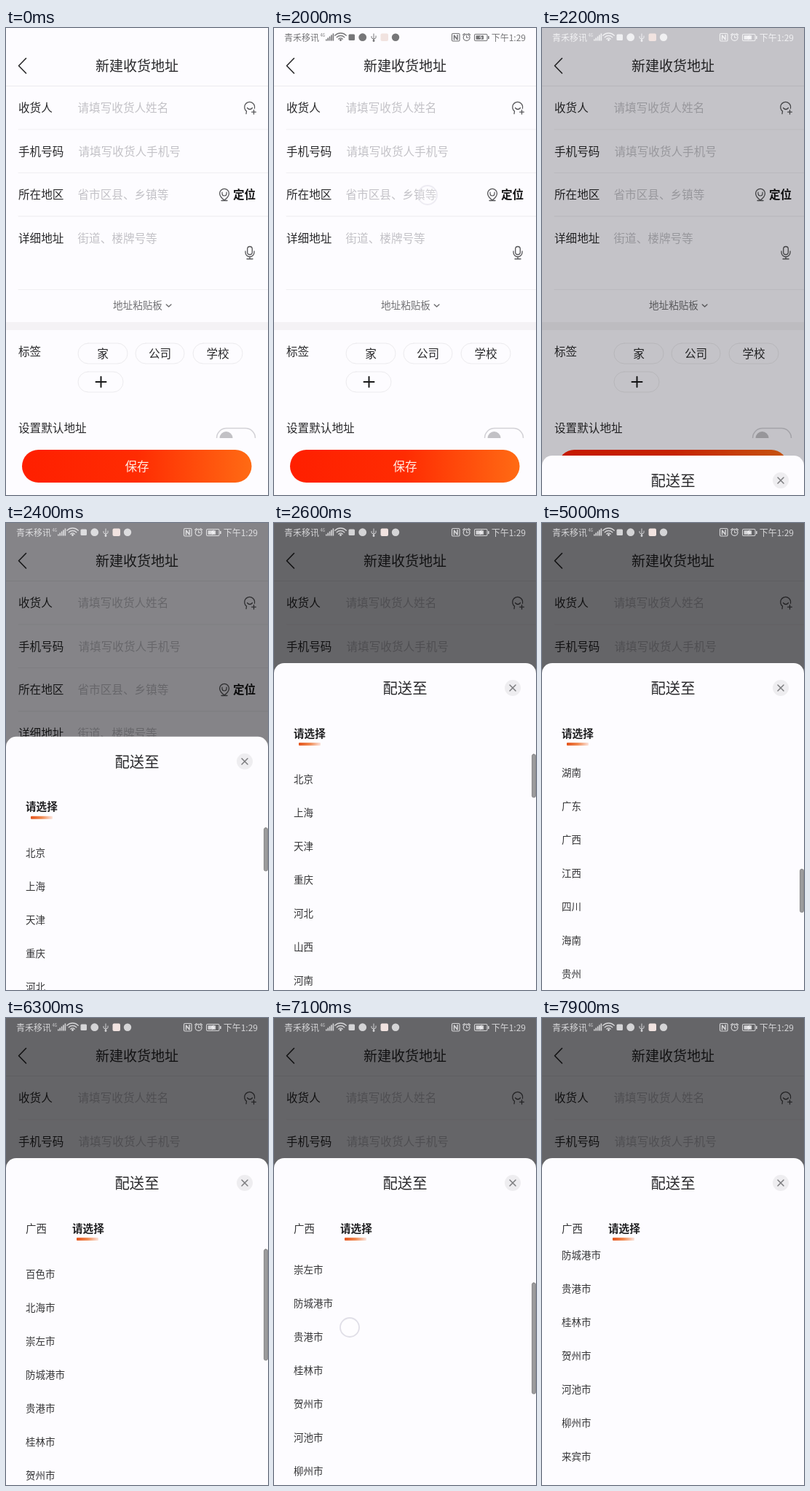
Write an HTML page with a canvas that moves like this. It is 360 by 640 pixels and loops after 8000 ms.

```html
<!DOCTYPE html>
<html lang="zh-CN">
<head>
<meta charset="utf-8">
<title>新建收货地址</title>
<style>
html, body { margin: 0; width: 100%; height: 100%; overflow: hidden; background: #fdfcff; }
canvas { display: block; width: 360px; height: 640px; }
</style>
</head>
<body>
<canvas id="stage"></canvas>
<script>
const W = 360, H = 640, LOOP = 8000, STEP = 100;
const FONT = '"Noto Sans CJK SC", "Noto Sans CJK", "Noto Sans", sans-serif';
const PAPER = '#fdfcff', INK = '#29292b', HINT = '#c3c2c7', LINE = '#f0eff2', ICON = '#555558';
const ROW = 46, LIST_TOP = 314;

const provinces = ('北京 上海 天津 重庆 河北 山西 河南 辽宁 吉林 黑龙江 内蒙古 江苏 山东 安徽 浙江 福建 ' +
  '湖北 湖南 广东 广西 江西 四川 海南 贵州 云南 西藏 陕西 甘肃 青海 宁夏 新疆 港澳 台湾 海外').split(' ');
const cities = '百色 北海 崇左 防城港 贵港 桂林 贺州 河池 柳州 来宾 南宁 钦州 梧州 玉林'
  .split(' ').map(name => name + '市');

const canvas = document.getElementById('stage');
const ctx = canvas.getContext('2d');
const dpr = window.devicePixelRatio || 1;
canvas.width = W * dpr;
canvas.height = H * dpr;

const clamp = x => Math.max(0, Math.min(1, x));
const ramp = (t, a, b) => clamp((t - a) / (b - a));
const easeOut = p => 1 - (1 - p) ** 3;
const easeInOut = p => p < .5 ? 2 * p * p : 1 - 2 * (1 - p) ** 2;
const mix = (a, b, p) => a + (b - a) * p;

// Keys are [time, value, ease into this key]
function track(keys, t) {
  if (t <= keys[0][0]) return keys[0][1];
  for (let i = 1; i < keys.length; i++) {
    const [t1, v1, ease = p => p] = keys[i];
    const [t0, v0] = keys[i - 1];
    if (t <= t1) return mix(v0, v1, ease((t - t0) / (t1 - t0)));
  }
  return keys[keys.length - 1][1];
}
const gray = v => `rgb(${Math.round(v)},${Math.round(v)},${Math.round(v) + 2})`;

const SHADE = [[2050, 253], [2200, 198], [2500, 102]];
const STATUS = [[2050, 118], [2200, 240], [2500, 212]];
const SCROLL_A = [[2900, 0], [3000, 12], [3150, 150], [3850, 915, easeOut], [3900, 915],
  [4400, 835, easeInOut], [5250, 790, easeOut]];
const SCROLL_B = [[6750, 0], [7050, 76], [7600, 164, easeOut]];
const BAR = [[2600, 1], [2850, 0], [2950, 0], [3000, 1], [5000, 1], [5300, 0], [6000, 0],
  [6200, 1], [7550, 1], [7850, 0]];
// Touches: start, end, from, to
const TOUCHES = [
  [1700, 1900, [211, 229], [211, 229]],
  [3000, 3150, [104, 540], [104, 390]],
  [3900, 4400, [104, 377], [104, 457]],
  [5500, 5650, [70, 436], [70, 436]],
  [6800, 7050, [104, 500], [104, 424]]
];

function text(str, x, y, size, color = INK, weight = 400, align = 'left') {
  ctx.font = `${weight} ${size}px ${FONT}`;
  ctx.textAlign = align;
  ctx.fillStyle = color;
  ctx.fillText(str, x, y + size * .38);
}
function box(x, y, w, h, r, fill) {
  ctx.beginPath();
  ctx.roundRect(x, y, w, h, r);
  if (fill) { ctx.fillStyle = fill; ctx.fill(); }
}
function disc(x, y, r, fill) {
  ctx.beginPath();
  ctx.arc(x, y, r, 0, Math.PI * 2);
  if (fill) { ctx.fillStyle = fill; ctx.fill(); }
}
function stroke(color, width) {
  ctx.strokeStyle = color;
  ctx.lineWidth = width;
  ctx.stroke();
}
function path(d, color, width) {
  ctx.strokeStyle = color;
  ctx.lineWidth = width;
  ctx.stroke(new Path2D(d));
}
function clipped(x, y, w, h, draw) {
  ctx.save();
  ctx.beginPath();
  ctx.rect(x, y, w, h);
  ctx.clip();
  draw();
  ctx.restore();
}
function gradient(x0, x1, ...stops) {
  const g = ctx.createLinearGradient(x0, 0, x1, 0);
  stops.forEach((c, i) => g.addColorStop(i / (stops.length - 1), c));
  return g;
}

function drawForm() {
  ctx.fillStyle = PAPER;
  ctx.fillRect(0, 0, W, H);
  path('M27.5 41.5 L17.5 51.7 L27.5 62', INK, 1.6);
  text('新建收货地址', 180, 52, 19, INK, 400, 'center');
  path('M0 79.5 H360 M17 258 H360', '#ecebee', 1);
  path('M17 139 H360 M17 198.5 H360 M17 358.5 H360', LINE, 1);

  [['收货人', '请填写收货人姓名', 109], ['手机号码', '请填写收货人手机号', 169],
   ['所在地区', '省市区县、乡镇等', 228], ['详细地址', '街道、楼牌号等', 288]]
    .forEach(([label, hint, y]) => {
      text(label, 17, y, 15.6);
      text(hint, y === 169 ? 99.5 : 98.5, y, 15.6, HINT);
    });

  // contact
  path('M330 117.5 L330.5 114 A7 7 0 1 1 341.5 110 M331.5 109.5 Q335 113.5 338.5 109.5 M340.5 112.5 V118 M337.7 115.2 H343.3', ICON, 1.3);
  // pin
  path('M300 236 C296 233 293.6 230.5 293.6 226.8 A6.4 6.4 0 0 1 306.4 226.8 C306.4 230.5 304 233 300 236 Z M296 236.5 H304', ICON, 1.3);
  path('M297 225 V227 A3 3 0 0 0 303 227 V225', ICON, 1.2);
  text('定位', 312, 228, 15.6, '#151516', 700);
  // microphone
  box(331.7, 299.5, 6.6, 11, 3.3);
  stroke(ICON, 1.3);
  path('M329 306 V307.5 A6 6 0 0 0 341 307.5 V306 M335 313.5 V316 M331 316.5 H339', ICON, 1.3);

  text('地址粘贴板', 147, 380, 13.6, '#707073');
  path('M220.3 379 L223.6 382 L226.9 379', '#707073', 1.5);
  ctx.fillStyle = '#f4f2f5';
  ctx.fillRect(0, 403, W, 11);

  text('标签', 17, 443, 15.6);
  [['家', 99, 68], ['公司', 178, 67], ['学校', 257, 68]].forEach(([name, x, w]) => {
    box(x, 432, w, 28, 14);
    stroke('#ecebee', 1);
    text(name, x + w / 2, 446, 15.6, INK, 400, 'center');
  });
  box(99, 471, 62, 28, 14);
  stroke('#ecebee', 1);
  path('M123.5 485 H137.5 M130.5 478 V492', '#19191a', 2);

  text('设置默认地址', 17, 548, 15.6);
  clipped(280, 540, 80, 22, () => {
    box(289.5, 548.5, 53, 27, 13.5);
    stroke('#d2d1d6', 1.5);
    disc(302.5, 562, 9, '#c2c1c5');
  });
  box(22, 578, 315.5, 45, 22.5, gradient(22, 338, '#ff1f00', '#ff2c02', '#ff6b14'));
  text('保存', 180, 601, 16.6, '#ffece2', 400, 'center');
}

function drawStatus(color, alpha) {
  ctx.save();
  ctx.globalAlpha = alpha;
  text('青禾移讯', 14, 13, 12, color);
  text('4G', 63.5, 9.5, 5.5, color);
  ctx.fillStyle = color;
  for (let i = 0; i < 5; i++) ctx.fillRect(71 + i * 2.4, 15.5 - i * 2, 1.6, 2 + i * 2);
  for (const r of [4, 7.5, 11]) {
    ctx.beginPath();
    ctx.arc(91.5, 18, r, -Math.PI * .75, -Math.PI * .25);
    stroke(color, 1.3);
  }
  disc(91.5, 16.5, 1.4, color);
  box(102.5, 8.5, 8.5, 8.5, 1.5, color);
  disc(121.7, 12.7, 5.4, color);
  path('M137 8 V18 M134 11.5 V13.5 L137 15.5 L140 13.5 V11', color, 1);
  disc(137, 17.5, 1.4, color);
  box(146.5, 7.5, 10.5, 10.5, 2, '#f1e3e0');
  disc(167, 12.7, 5.2, color);

  box(244.5, 7.5, 10.5, 10.5, 1.5);
  stroke(color, 1.2);
  path('M247.5 16 V10 L252 16 V9.5', color, 1.5);
  disc(264.6, 13, 4.4);
  stroke(color, 1.2);
  path('M264.6 10.5 V13.2 H267 M259.5 9.5 L262 7.5 M269.7 9.5 L267.2 7.5', color, 1.1);
  box(275.5, 8.5, 17.5, 9, 1.5);
  stroke(color, 1.1);
  box(277.5, 10.3, 10.5, 5.4, .5, color);
  box(294, 11, 1.6, 4, .5, color);
  path('M285 10 L282.5 13 H286 L283.5 16', PAPER, .9);
  text('下午1:29', 346, 13, 12, color, 400, 'right');
  ctx.restore();
}

function drawList(names, offset, x) {
  names.forEach((name, i) => {
    const y = 351 + i * ROW - offset;
    if (y > LIST_TOP - 12 && y < H + 12) text(name, x, y, 13.5, '#343436');
  });
}

function drawSheet(t, top) {
  const tabbed = t >= 5700;
  const page = easeOut(ramp(t, 5700, 6200));
  const offA = track(SCROLL_A, t), offB = track(SCROLL_B, t);
  ctx.save();
  ctx.translate(0, top - 192);
  box(0, 192, W, H, [14, 14, 0, 0], PAPER);
  text('配送至', 180, 226.5, 20.3, INK, 400, 'center');
  disc(328, 226, 11, '#eeedf0');
  path('M324 222 L332 230 M332 222 L324 230', '#7c7c7f', 1.5);

  if (tabbed) text('广西', 27, 288, 14.5, '#343436');
  text('请选择', tabbed ? 91 : 27, 288, 14.6, '#202022', 700);
  const mark = mix(34, 97, page);
  box(mark, 301, 30, 4, 1, gradient(mark, mark + 30, '#e4531c', '#f08a52', '#fbe3dc'));

  clipped(0, LIST_TOP, W, H - LIST_TOP, () => {
    if (page < 1) drawList(provinces, offA, 27 - W * page);
    if (page > 0) drawList(cities, offB, 27 + W * (1 - page));
  });

  ctx.globalAlpha = track(BAR, t);
  const [y, h] = tabbed ? [317 + offB * .47, 152] : [317 + offA * .199, 59];
  box(354.5, y, 5, h, 2, '#9b9b9c');
  stroke('#7c7c7d', .8);
  ctx.restore();
}

function drawTouches(t) {
  for (const [start, end, a, b] of TOUCHES) {
    if (t < start || t > end + 200) continue;
    const p = ramp(t, start, end);
    ctx.save();
    ctx.globalAlpha = 1 - .75 * ramp(t, end, end + 120) - .25 * ramp(t, end + 120, end + 200);
    disc(mix(a[0], b[0], p), mix(a[1], b[1], p), 13, 'rgba(255,255,255,.6)');
    stroke('#d2d0dc', 1.8);
    ctx.restore();
  }
}

function draw(t) {
  ctx.setTransform(dpr, 0, 0, dpr, 0, 0);
  ctx.lineCap = ctx.lineJoin = 'round';
  drawForm();
  if (t > 2050) {
    ctx.globalCompositeOperation = 'multiply';
    ctx.fillStyle = gray(track(SHADE, t));
    ctx.fillRect(0, 0, W, H);
    ctx.globalCompositeOperation = 'source-over';
  }
  drawStatus(gray(track(STATUS, t)), ramp(t, 0, 300));
  const rise = easeInOut(ramp(t, 2083, 2560));
  if (rise > 0) drawSheet(t, mix(H, 192, rise));
  drawTouches(t);
}

const begin = performance.now();
function tick() {
  const t = (performance.now() - begin) % LOOP;
  draw(Math.floor(t / STEP) * STEP);
  requestAnimationFrame(tick);
}
tick();
</script>
</body>
</html>
```
